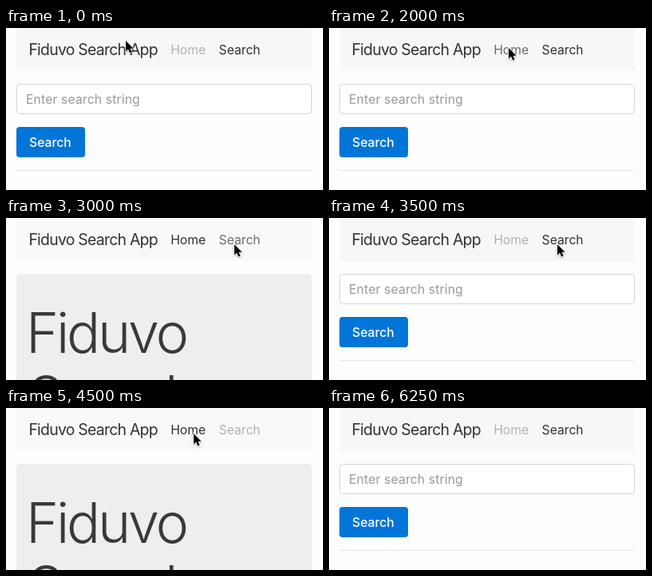
Recreate the animation shown at these times as an HTML page. Size 397x203 px, loop 7000 ms.

```html
<!DOCTYPE html>
<html lang="en">
<head>
<meta charset="utf-8">
<title>Fiduvo Search App</title>
<style>
html, body { margin: 0; width: 100%; height: 100%; overflow: hidden; background: #fdfdfd; }
svg { display: block; font: 15.7px Inter, "Open Sans", sans-serif; fill: #303132; }
.brand { font-size: 19.4px; letter-spacing: -.74px; }
.display { font-size: 70px; font-weight: 300; letter-spacing: -3.2px; fill: #37393b; }
#cursor { filter: drop-shadow(0 1px 1px #0004); }
</style>
</head>
<body>
<svg width="397" height="203" viewBox="0 0 397 203">
  <rect id="bar" x="13" width="370" height="53.5"/>
  <text class="brand" x="28.4" y="34">Fiduvo Search App</text>
  <text id="homeLink" x="206.2" y="33">Home</text>
  <text id="searchLink" x="266.6" y="33">Search</text>

  <g id="searchPage">
    <rect x="13.5" y="70.5" width="369" height="37" rx="4" fill="#fff" stroke="#d5d5d5"/>
    <text x="25" y="95" fill="#999" letter-spacing=".15">Enter search string</text>
    <rect x="13" y="124" width="86" height="38" rx="4" fill="#0275d8"/>
    <text x="29" y="149" fill="#fff" font-weight="500">Search</text>
    <rect x="13" y="178" width="370" height="1" fill="#e5e5e5"/>
  </g>

  <g id="homePage">
    <rect x="13" y="70" width="370" height="150" rx="5" fill="#eceeef"/>
    <text class="display" x="25" y="169">Fiduvo</text>
    <text class="display" x="28" y="247.5">Search</text>
  </g>

  <path id="cursor" d="M1 1v13.4l3-2.8 2.2 5 2.4-1-2.2-4.8h4.2z"
        fill="#000" stroke="#fff" stroke-width="1.4" paint-order="stroke"/>
</svg>
<script>
const LOOP = 7000;
const ACTIVE = '#303132', HOVER = '#6c6c6d', IDLE = '#b2b2b3';
const $ = id => document.getElementById(id);

// start time, page, inactive link hovered, pointer position
const steps = [
  [0, 'search', false, 149, 15],
  [250, 'search', false, 298, 44],
  [500, 'search', false, 293, 36],
  [1250, 'search', false, 285, 29],
  [1500, 'search', false, 279, 24],
  [1750, 'search', true, 230, 26],
  [2000, 'search', true, 224, 24],
  [2250, 'home', false, 224, 24],
  [2750, 'home', true, 272, 30],
  [3000, 'home', true, 285, 32],
  [3500, 'search', false, 285, 32],
  [4000, 'search', true, 239, 32],
  [4250, 'search', true, 234, 31],
  [4500, 'home', false, 234, 31],
  [5250, 'home', true, 270, 31],
  [5500, 'home', true, 282, 34],
  [5750, 'search', false, 282, 34],
  [6000, 'search', true, 175, 34],
  [6250, 'search', false, -50, 0],
];

function draw(now) {
  const t = now % LOOP;
  const [, page, hover, x, y] = steps.findLast(s => s[0] <= t);
  const onHome = page === 'home';
  const other = hover ? HOVER : IDLE;
  $('homePage').style.display = onHome ? '' : 'none';
  $('searchPage').style.display = onHome ? 'none' : '';
  $('bar').style.fill = onHome ? '#f9f9fa' : '#f6f7f8';
  $('homeLink').style.fill = onHome ? ACTIVE : other;
  $('searchLink').style.fill = onHome ? other : ACTIVE;
  $('cursor').setAttribute('transform', `translate(${x} ${y})`);
}

const start = performance.now();
function tick() {
  draw(performance.now() - start);
  requestAnimationFrame(tick);
}
tick();
</script>
</body>
</html>
```
